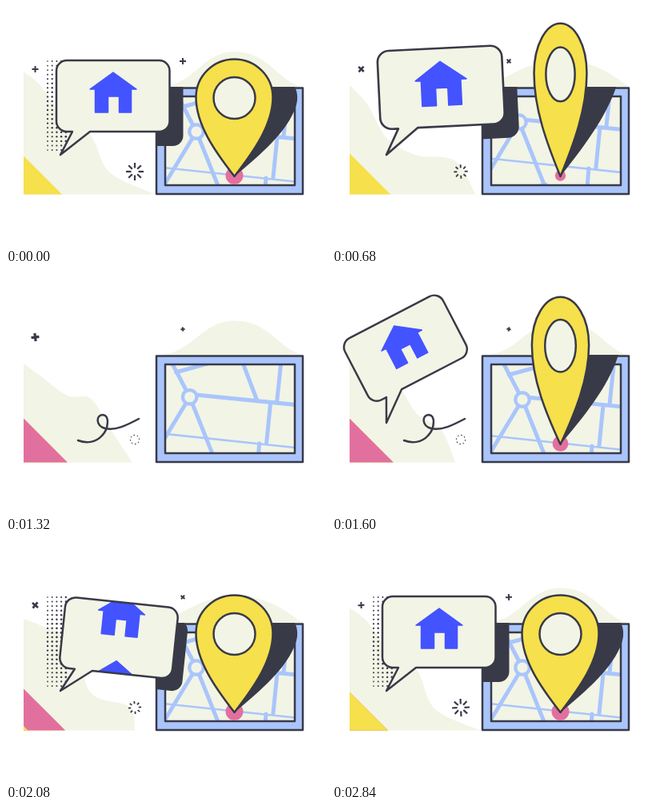
Recreate the animation shown at these times as an HTML page with a canvas. Size 400 by 300 pixels, loop 2.88 s.

```html
<!DOCTYPE html>
<html lang="en">
<head>
<meta charset="utf-8">
<title>Home on the map</title>
<style>
html, body { margin: 0; width: 100%; height: 100%; overflow: hidden; background: #fff; }
canvas { display: block; width: 400px; height: 300px; }
</style>
</head>
<body>
<canvas id="stage" width="400" height="300"></canvas>
<script>
const LOOP = 2880, STEP = 40, TAU = Math.PI * 2, LINE = 2.5;
const DARK = '#393a48', CREAM = '#f2f4e5', YELLOW = '#f6e04b',
      PINK = '#e2709f', SKY = '#a9c5fc', BLUE = '#4353ff';
const ctx = document.getElementById('stage').getContext('2d');

// Timing helpers
const span = (t, from, to) => Math.min(Math.max((t - from) / (to - from), 0), 1);
const ease = (t, from, to) => { const u = span(t, from, to); return u * u * (3 - 2 * u); };
const bump = (t, from, to) => Math.sin(Math.PI * span(t, from, to)) ** 2;
const backIn = (u, pull = 1.7) => u * u * ((pull + 1) * u - pull);
const backOut = (u, pull) => 1 - backIn(1 - u, pull);
const wave = (t, delay = 0, period = LOOP) => Math.cos((t - delay) / period * TAU);

// Drawing helpers
function paint(path, fill, stroke, width = LINE) {
  if (fill) { ctx.fillStyle = fill; ctx.fill(path); }
  if (stroke) { ctx.strokeStyle = stroke; ctx.lineWidth = width; ctx.stroke(path); }
}

function ellipse(x, y, rx, ry = rx) {
  const p = new Path2D();
  p.ellipse(x, y, Math.max(rx, 0), Math.max(ry, 0), 0, 0, TAU);
  return p;
}

function scoped(draw) { ctx.save(); draw(); ctx.restore(); }

function curveThrough(points) {
  const p = new Path2D(), last = points.length - 1;
  p.moveTo(...points[0]);
  for (let i = 0; i < last; i++) {
    const a = points[Math.max(i - 1, 0)], b = points[i];
    const c = points[i + 1], d = points[Math.min(i + 2, last)];
    p.bezierCurveTo(b[0] + (c[0] - a[0]) / 6, b[1] + (c[1] - a[1]) / 6,
      c[0] - (d[0] - b[0]) / 6, c[1] - (d[1] - b[1]) / 6, ...c);
  }
  return p;
}

function drawHills(t) {
  const edge = 97 - 15 * wave(t, -100);
  const left = curveThrough([
    [22, edge],
    [44, edge + 16 + 8 * wave(t, 600)],
    [77 - 8 * wave(t, 600), 145 + 21 * wave(t, 760)],
    [106, 173 + 19 * wave(t, 500, LOOP / 2)],
    [141 + 13 * wave(t, 600, LOOP / 2), 200 + 11 * wave(t, -340)],
    [171 + 17 * wave(t, 200), 235.5]
  ]);
  left.lineTo(22, 235.5);
  paint(left, CREAM);

  const low = (1 - wave(t, 40, LOOP / 2)) / 2, top = 57.2 + 11 * low;
  paint(new Path2D(`M188 102C${238 - 20 * low} ${100 - 8 * low} 243 ${top} 286 ${top}` +
    `S${338 + 14 * low} ${94 - 7 * low} 372 102Z`), CREAM);
}

function drawCorner(t) {
  const size = 51.5 - 3.5 * wave(t);
  const triangle = (s, color) =>
    paint(new Path2D(`M22 ${235.5 - s}L${22 + s} 235.5H22Z`), color);
  triangle(size, YELLOW);
  triangle(size * ease(t, 880, 1240), PINK);
  triangle(size * ease(t, 2000, 2400), YELLOW);
}

function drawDots(t) {
  const grow = 1 - ease(t, 320, 640) + ease(t, 1760, 2060);
  if (grow < .02) return;
  for (let i = 0; i < 5; i++)
    for (let j = 0; j < 21; j++)
      paint(ellipse(52 + 5.7 * i, 69 + 5.55 * j,
        grow * (.85 + .08 * i + .35 * Math.sin(Math.PI * j / 20))), DARK);
}

function drawPlus(t, x, y, half, width) {
  scoped(() => {
    ctx.translate(x, y);
    ctx.rotate(t / LOOP * Math.PI);
    ctx.lineCap = 'butt';
    paint(new Path2D(`M${-half} 0H${half}M0 ${-half}V${half}`), null, DARK, width);
  });
}

function drawBurst(t) {
  const open = (1 + wave(t)) / 2;
  scoped(() => {
    ctx.translate(161, 207);
    ctx.rotate(t / LOOP * Math.PI);
    ctx.lineCap = 'butt';
    for (let i = 0; i < 8; i++) {
      ctx.rotate(TAU / 8);
      paint(new Path2D(`M${5 - .5 * open} 0H${6 + 5 * open}`), null, DARK, 1.5 + .7 * open);
    }
  });
}

const swirl = new Path2D('M166 181C151 189 137 196 124 193C112 190 112 176 121 176' +
  'C130 177 128 194 120 202C112 211 100 212 90 208');
function drawSwirl(t) {
  const drawn = ease(t, 890, 1260), erased = ease(t, 1680, 2020), length = 136;
  if (drawn - erased < .005) return;
  scoped(() => {
    ctx.setLineDash([(drawn - erased) * length, length * 2]);
    ctx.lineDashOffset = -erased * length;
    paint(swirl, null, DARK);
  });
}

// Coordinates are relative to the roundabout.
const roads = new Path2D('M0-3.5L175 14M50-86L84 4M119-90L109 6M101 7L96 57' +
  'M87 58L82 120M0 0L48 120M33 78L-45 100M0 0L-55 91M0 0L-45-86M-17-31L60-52');
const lane = new Path2D('M-70 42L185 69');
const mapArea = new Path2D('M187 101H373V236.5H187Z');
const mapInside = new Path2D('M199 113H361V224H199Z');

function drawMap(t) {
  paint(new Path2D('M188 102.5H371V235H188Z'), SKY, DARK);
  paint(mapInside, CREAM);
  scoped(() => {
    ctx.clip(mapInside);
    ctx.translate(238 - 19 * bump(t, 520, 1560), 157 - 41 * bump(t, 520, 1400));
    paint(roads, null, SKY, 5);
    paint(lane, null, SKY, 2.6);
    paint(ellipse(0, 0, 8.7), CREAM, SKY, 4.2);
  });
  paint(mapInside, null, DARK);
}

function drawPin(t) {
  const x = 285.5, landing = bump(t, 1680, 1960);
  const dip = landing + bump(t, 320, 720);
  const spot = 11 * (1 - ease(t, 560, 840) + ease(t, 1440, 1640));
  if (spot > .1) paint(ellipse(x, 212 + 2 * landing, spot + 3 * landing, spot - 4 * landing), PINK);

  const grow = t < LOOP / 2 ? 1 - backIn(span(t, 500, 840), 3.5) : backOut(span(t, 1440, 1880), 3.5);
  if (grow < .01) return;
  const wide = grow > 1 ? 2 - grow : grow;
  const tip = 213 + 5 * landing, crown = tip - 146.5 * grow, top = crown + 12 * dip;
  const h = tip - top, mid = top + h * .325;
  const side = s => x + s * 48 * wide;
  const pin = new Path2D(
    `M${x} ${tip}C${side(-.5)} ${top + h * .79} ${side(-1)} ${top + h * .56} ${side(-1)} ${mid}` +
    `C${side(-1)} ${top + h * .145} ${side(-.55)} ${top} ${x} ${top}` +
    `C${side(.55)} ${top} ${side(1)} ${top + h * .145} ${side(1)} ${mid}` +
    `C${side(1)} ${top + h * .56} ${side(.5)} ${top + h * .79} ${x} ${tip}Z`);
  scoped(() => {
    ctx.clip(mapArea);
    ctx.translate(0, tip);
    ctx.transform(1, 0, -.29, .88, 0, 0);
    ctx.translate(0, -tip);
    paint(pin, DARK);
  });
  paint(pin, YELLOW, DARK);
  paint(ellipse(x, crown + 48.5 * grow + 11 * dip, 26 * wide + 3 * dip, 26 * grow - 3 * dip),
    CREAM, DARK);
}

// Coordinates are relative to the tip of the tail.
const bubble = new Path2D('M15-29H8A13 13 0 0 1-5-42V-105A13 13 0 0 1 8-118H123.5' +
  'A13 13 0 0 1 136.5-105V-42A13 13 0 0 1 123.5-29H37L0 0Z');
const house = new Path2D('M66-103L95-82H88.500V-53H73.500V-73H59.500V-53H43.500V-82H37Z');

function bubblePose(t) {
  if (t < LOOP / 2) {
    const k = backIn(span(t, 480, 945));
    return { scale: 1 - k, degrees: 28 * k };
  }
  const u = span(t, 1460, 2280);
  return {
    scale: backOut(span(t, 1460, 1860)),
    degrees: -38 * (1 - u) * Math.cos(3 * u)
  };
}

function drawBubble(t) {
  const { scale, degrees } = bubblePose(t);
  if (scale < .01) return;
  const shift = 23 * ease(t, 1500, 2000) + 59 * ease(t, 2060, 2480);
  const depth = 1 - .03 * Math.abs(degrees);
  const place = () => {
    ctx.translate(68, 186);
    ctx.rotate(degrees * Math.PI / 180);
    ctx.scale(scale, scale);
  };
  scoped(() => {
    ctx.clip(mapArea);
    place();
    ctx.translate(17 * depth, 18 * depth);
    paint(bubble, DARK);
  });
  scoped(() => {
    place();
    paint(bubble, CREAM);
    scoped(() => {
      ctx.clip(bubble);
      ctx.translate(0, -shift);
      paint(house, BLUE, BLUE, 1.5);
      ctx.translate(0, 82);
      paint(house, BLUE, BLUE, 1.5);
    });
    paint(bubble, null, DARK, LINE / Math.sqrt(scale));
  });
}

function render(now) {
  const t = Math.floor(now % LOOP / STEP) * STEP;
  const swell = (1 - wave(t)) / 2;
  ctx.fillStyle = '#fff';
  ctx.fillRect(0, 0, 400, 300);
  ctx.lineCap = ctx.lineJoin = 'round';
  drawHills(t);
  drawCorner(t);
  drawDots(t);
  drawSwirl(t);
  drawBurst(t);
  drawPlus(t, 36.5, 79, 4 + swell, 2 + 1.2 * swell);
  drawPlus(t, 221, 69, 4 - 1.4 * swell, 2);
  drawMap(t);
  drawPin(t);
  drawBubble(t);
}

const start = performance.now();
function frame() {
  render(performance.now() - start);
  requestAnimationFrame(frame);
}
frame();
</script>
</body>
</html>
```
